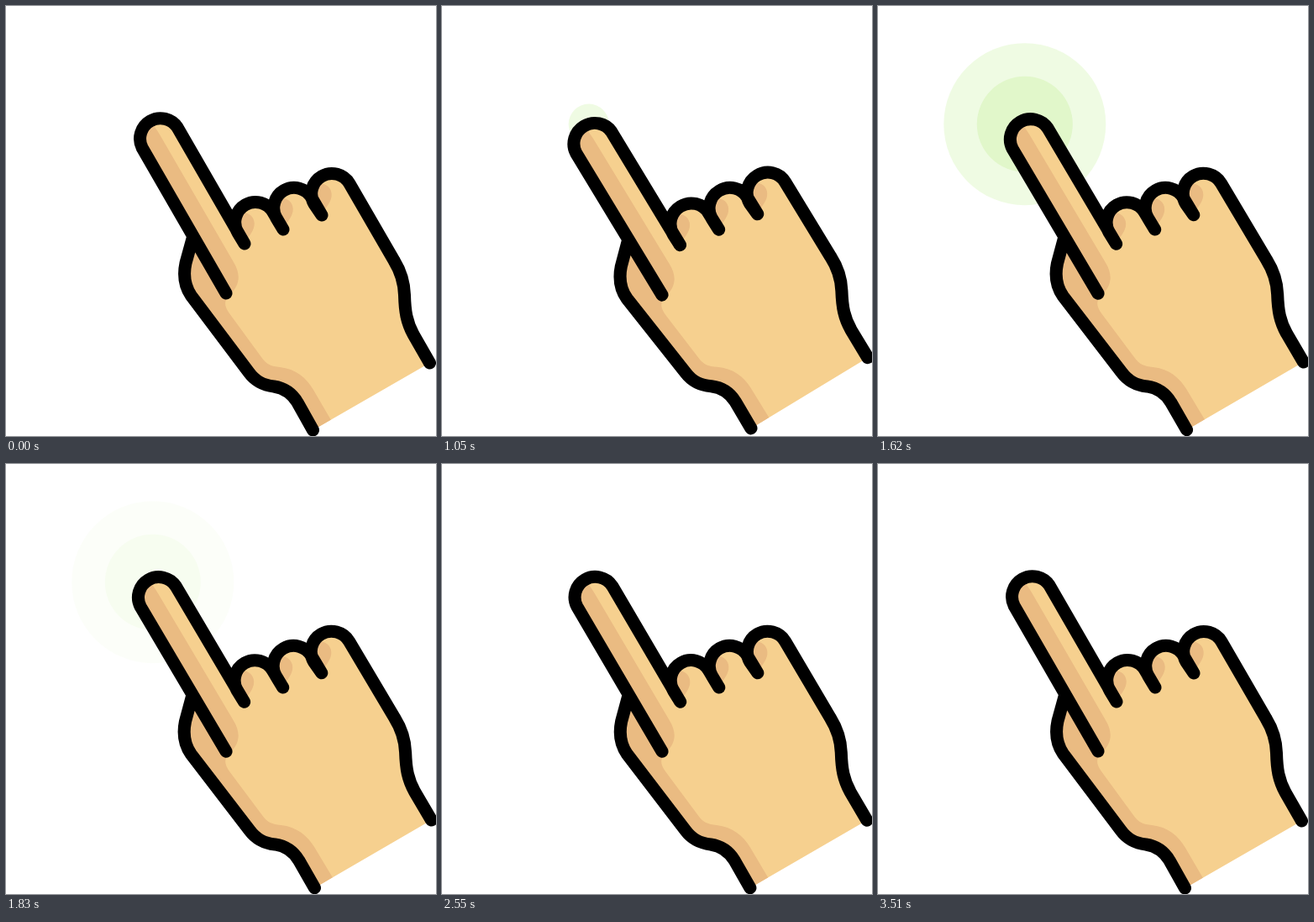
Recreate the animation shown at these times as an HTML page with a canvas. Size 512 by 512 pixels, loop 3.57 s.

```html
<!DOCTYPE html>
<html lang="en">
<head>
<meta charset="utf-8">
<title>Tap</title>
<style>
  html, body { margin: 0; width: 100%; height: 100%; overflow: hidden; background: #fff; }
  canvas { display: block; width: 100vw; height: 100vh; }
</style>
</head>
<body>
<canvas id="stage" width="512" height="512"></canvas>
<script>
const ctx = document.getElementById('stage').getContext('2d');
const LOOP = 3570, STEP = 30;
const SKIN = '#f6d08f', SHADE = '#eabb82';

const finger = 'M262 342 L162.2 169 A24.3 24.3 0 0 1 204.2 144.7 L284 283';
const knuckles = 'L276 269.8 A24.2 24.2 0 0 1 318 245.6 L330 266 ' +
  'L322 252.6 A24.2 24.2 0 0 1 364 228.5 L376 249 ' +
  'L367 235.8 A24.2 24.2 0 0 1 409 211.6';
const side = 'L462 303 C470 316 474 328 474.5 344 C475 364 477 376 485 391 L504.5 425';
const thumb = 'L222 277 L214 306 C211 320 213 334 220.5 345 L289 436 ' +
  'C297 447 306 451.5 319 453 C332 455 341 462 347 472 L365.5 505';

const body = new Path2D(`${finger} ${knuckles} ${side} L365.5 505 ` +
  'L347 472 C341 462 332 455 319 453 C306 451.5 297 447 289 436 ' +
  'L220.5 345 C213 334 211 320 214 306 L222 277 Z');
const outline = new Path2D(`${finger} ${knuckles} ${side} M222 277 ${thumb}`);
const fingerShade = new Path2D('M150 150 L172 138 Q177 143 183 153 L271 305 ' +
  'C280 320 278 332 268 342 L262 350 L240 320 Z');
const palmShade = new Path2D('M222 277 L262 342 L262 350 Q259 356 266 366 L304 418 ' +
  'C310 427 316 429 326 430 C345 432 358 443 366 457 L387 493 L365 506 ' +
  'L342 466 L300 456 L205 335 L205 310 Z');
const knuckleShade = new Path2D('M276 268 L282 246 C292 246 297 254 295.5 262 ' +
  'C294 270 288 275 284 283 Z');

const clamp = v => Math.min(1, Math.max(0, v));
const span = (t, from, to) => clamp((t - from) / (to - from));
const smooth = u => u * u * (3 - 2 * u);
const mix = (a, b, u) => a + (b - a) * u;

function ring(radius, alpha) {
  if (radius <= 0 || alpha <= 0) return;
  ctx.fillStyle = `rgba(150,225,70,${alpha})`;
  ctx.beginPath();
  ctx.arc(174.8, 140.7, radius, 0, Math.PI * 2);
  ctx.fill();
}

// lean: sideways sway that eases away slowly; press: the quick tap
function pose(t) {
  if (t < 1050) {
    const u = smooth(span(t, 810, 1050));
    return { lean: u, press: u };
  }
  if (t < 1260) {
    const u = smooth(span(t, 1050, 1260));
    return { lean: mix(1, 0.85, u), press: mix(1, 0.17, u) };
  }
  const rest = 1 - span(t, 1260, 3510) ** 2;
  return { lean: 0.85 * rest, press: 0.17 * rest };
}

function hand({ lean, press }) {
  const x = 183, y = 157;
  const ax = 0.0063 * lean, bx = 0.011 * lean;
  const ay = -0.033 * press, by = -0.0046 * press;
  ctx.save();
  ctx.transform(1 + ax, ay, bx, 1 + by,
    -2.5 * lean - ax * x - bx * y,
    5.6 * press - ay * x - by * y);

  ctx.save();
  ctx.clip(body);
  ctx.fillStyle = SKIN;
  ctx.fillRect(100, 100, 440, 430);
  ctx.fillStyle = SHADE;
  ctx.fill(palmShade);
  ctx.fill(fingerShade);
  for (let i = 0; i < 3; i++) {
    ctx.fill(knuckleShade);
    ctx.translate(46, -17.2);
  }
  ctx.restore();

  ctx.lineWidth = 15;
  ctx.lineCap = ctx.lineJoin = 'round';
  ctx.strokeStyle = '#000';
  ctx.stroke(outline);
  ctx.restore();
}

function draw(now) {
  const t = Math.floor((now % LOOP) / STEP) * STEP;
  ctx.fillStyle = '#fff';
  ctx.fillRect(0, 0, 512, 512);
  ring(96.5 * span(t, 960, 1320), 0.15 * (1 - span(t, 1620, 1890)));
  ring(57 * span(t, 1020, 1320), 0.16 * (1 - span(t, 1620, 1920)));
  hand(pose(t));
}

let start;
function tick(now) {
  if (start === undefined) start = now;
  draw(now - start);
  requestAnimationFrame(tick);
}
draw(0);
requestAnimationFrame(tick);
</script>
</body>
</html>
```
